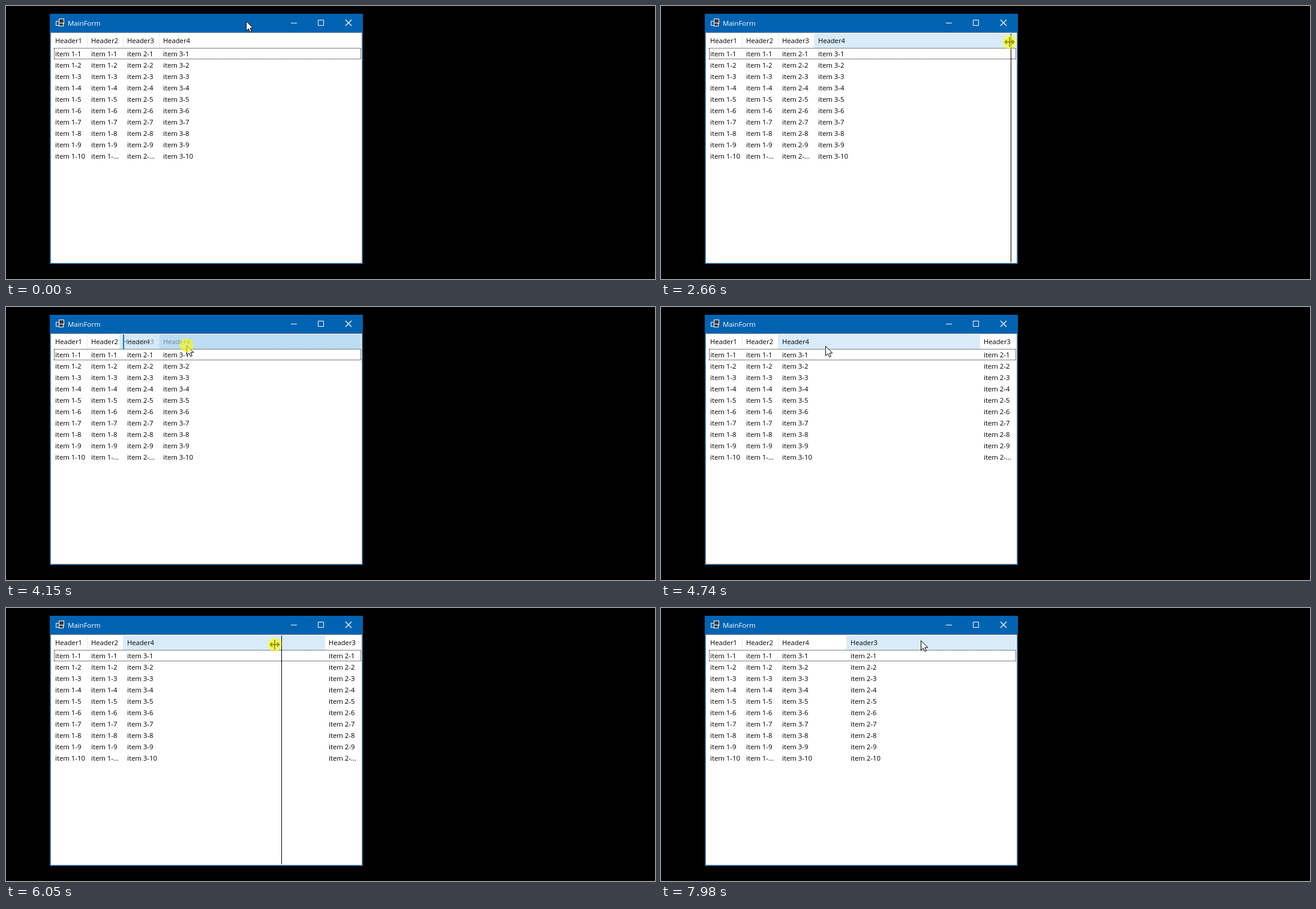
Animation, 1082 px wide and 456 px high, one loop 8000 ms. Source, as an HTML page:

```html
<!DOCTYPE html>
<html lang="en">
<head>
<meta charset="utf-8">
<title>MainForm</title>
<style>
  html, body { margin: 0; width: 100%; height: 100%; overflow: hidden; background: #000; }
  svg { display: block; width: 1082px; height: 456px; }
  text { font: 11.4px "Open Sans", "Noto Sans", sans-serif; white-space: pre; }
  .head { font-size: 11.2px; }
</style>
</head>
<body>
<svg viewBox="0 0 1082 456" xmlns="http://www.w3.org/2000/svg">
  <rect width="1082" height="456" fill="#000"/>
  <g shape-rendering="crispEdges">
    <rect x="73" y="13" width="522" height="418" fill="#0063b1"/>
    <rect x="74.5" y="44.5" width="519" height="385" fill="#fff" stroke="#828790"/>
  </g>
  <g stroke="#fff" fill="#3c3c3c">
    <rect x="83.5" y="25.5" width="6" height="7" fill="#0063b1"/>
    <rect x="88.5" y="21.5" width="8" height="8"/>
    <rect x="88.5" y="28.5" width="7" height="5"/>
  </g>
  <text x="103" y="33" fill="#fff">MainForm</text>
  <path d="M475 28.5h10M520.5 23.5h9v9h-9z" fill="none" stroke="#fff"/>
  <path d="M566 23l10 10M576 23l-10 10" stroke="#fff" stroke-width="1.3"/>
  <g id="cols"></g>
  <path d="M80 70.5H592M80 88.5H592M80.5 71V88M591.5 71V88" fill="none" stroke="#000"
        stroke-dasharray="1 1" shape-rendering="crispEdges"/>
  <g id="ghost" opacity=".6">
    <rect y="46" width="336" height="24" fill="#bcdcf4"/>
    <text class="head" x="6" y="62">Header4</text>
  </g>
  <rect id="mark" x="195" y="46" width="2" height="24" fill="#0078d7"/>
  <rect id="line" y="46" width="1" height="382" fill="#000"/>
  <path id="arrow" d="M.5 .5V16.6L4.3 13L6.8 18.5L9.3 17.4L6.9 12H11.8Z" fill="#fff" stroke="#000"/>
  <path id="split" d="M0-8V8M-7 0H7M-4-3.5L-7.5 0L-4 3.5M4-3.5L7.5 0L4 3.5" fill="none" stroke="#000" stroke-width="1.8"/>
  <circle id="press" r="11.5" fill="#ff0" opacity=".58"/>
</svg>
<script>
const LOOP = 8000;
const NS = 'http://www.w3.org/2000/svg';
const LEFT = 76, RIGHT = 592, NARROW = 60;
const REORDERED = 4620, RESIZED = 6460;
const $ = id => document.getElementById(id);

// One stroke of the pointer; with a release time the button is held from its start
const stroke = (start, end, x, y, release = 0) => ({ start, end, x, y, release });
const strokes = [
  stroke(480, 660, 400, 60),
  stroke(1560, 1700, 366, 60),
  stroke(1700, 2230, 589, 60),
  stroke(2600, 3370, 434, 54, 3350),
  stroke(3460, 3660, 368, 62),
  stroke(3700, 4370, 274, 65, REORDERED),
  stroke(4770, 5410, 552, 63),
  stroke(5470, 5710, 533, 61),
  stroke(5900, 6273, 310, 61, RESIZED),
  stroke(RESIZED, 6700, 547, 61),
  stroke(6760, 6970, 589, 60),
  stroke(7280, 7820, 433, 54, 7980)
];

const clamp = k => Math.min(1, Math.max(0, k));
const progress = (s, t) => clamp((t - s.start) / (s.end - s.start));
const ease = k => (k + k * k * (3 - 2 * k)) / 2;

function pointer(t) {
  let x = 400, y = 25;
  for (const s of strokes) {
    const k = ease(progress(s, t));
    x += (s.x - x) * k;
    y += (s.y - y) * k;
  }
  return [Math.round(x), Math.round(y)];
}

// Left and right edge of every column; the last one shown fills the list
function layout(t) {
  const order = t < REORDERED ? [0, 1, 2, 3] : [0, 1, 3, 2];
  const wide = t < RESIZED ? 336 : 114;
  const spans = [];
  let x = LEFT;
  order.forEach((c, i) => {
    const end = i === 3 ? RIGHT : x + (c === 3 ? wide : NARROW);
    spans[c] = [x, end];
    x = end;
  });
  return spans;
}

const edgeAt = (spans, x) => spans.findIndex(s => Math.abs(x - s[1]) < 6);
const columnAt = (spans, x) => spans.findIndex(s => x >= s[0] && x < s[1]);

function add(parent, tag, attrs, text = '') {
  const el = document.createElementNS(NS, tag);
  for (const k in attrs) el.setAttribute(k, attrs[k]);
  el.textContent = text;
  parent.appendChild(el);
  return el;
}

const cols = [1, 1, 2, 3].map((prefix, i) => {
  const g = add($('cols'), 'g', {});
  const back = add(g, 'rect', { y: 46, height: 24 });
  const edge = add(g, 'rect', { y: 46, width: 1, height: 24, fill: '#e8e8e8' });
  add(g, 'text', { class: 'head', x: 6, y: 62 }, 'Header' + (i + 1));
  let last;
  for (let n = 1; n <= 10; n++) {
    last = add(g, 'text', { x: 6, y: 65 + 19 * n }, `item ${prefix}-${n}`);
  }
  return { g, back, edge, last, prefix };
});

const show = (el, on) => el.setAttribute('display', on ? 'inline' : 'none');
const place = (el, x, y) => el.setAttribute('transform', `translate(${x} ${y})`);

function draw(t) {
  const [x, y] = pointer(t);
  const spans = layout(t);
  const held = strokes.find(s => t >= s.start && t < s.release);

  // While held, the grabbed edge or column stays active
  const grabX = held ? pointer(held.start)[0] : x;
  const inHeader = y >= 46;
  const edge = inHeader ? edgeAt(spans, grabX) : -1;
  const split = edge >= 0;
  const hot = split ? edge : inHeader ? columnAt(spans, grabX) : -1;
  const moving = held && !split;

  cols.forEach((c, i) => {
    const [a, b] = spans[i], w = b - a;
    place(c.g, a, 0);
    c.back.setAttribute('width', w);
    c.back.setAttribute('fill', i !== hot ? '#fff' : moving ? '#bcdcf4' : '#d9ebf9');
    c.edge.setAttribute('x', w - 1);
    show(c.edge, i !== hot);
    c.last.textContent = `item ${c.prefix}-` + (i && w === NARROW ? '…' : '10');
  });

  const shift = x - grabX;
  show($('ghost'), moving && shift < 0);
  show($('mark'), moving && shift < -40);
  if (moving) place($('ghost'), spans[hot][0] + shift, 0);

  show($('line'), held && split);
  if (held) {
    // The divider trails the pointer while it moves
    const lag = 12.5 * Math.sin(Math.PI * progress(held, t));
    $('line').setAttribute('x', Math.round(x - 1 + lag));
  }

  show($('split'), split);
  show($('arrow'), !split);
  show($('press'), held);
  for (const id of ['split', 'arrow', 'press']) place($(id), x, y);
}

const start = performance.now();
function tick() {
  draw((performance.now() - start) % LOOP);
  requestAnimationFrame(tick);
}
tick();
</script>
</body>
</html>
```
